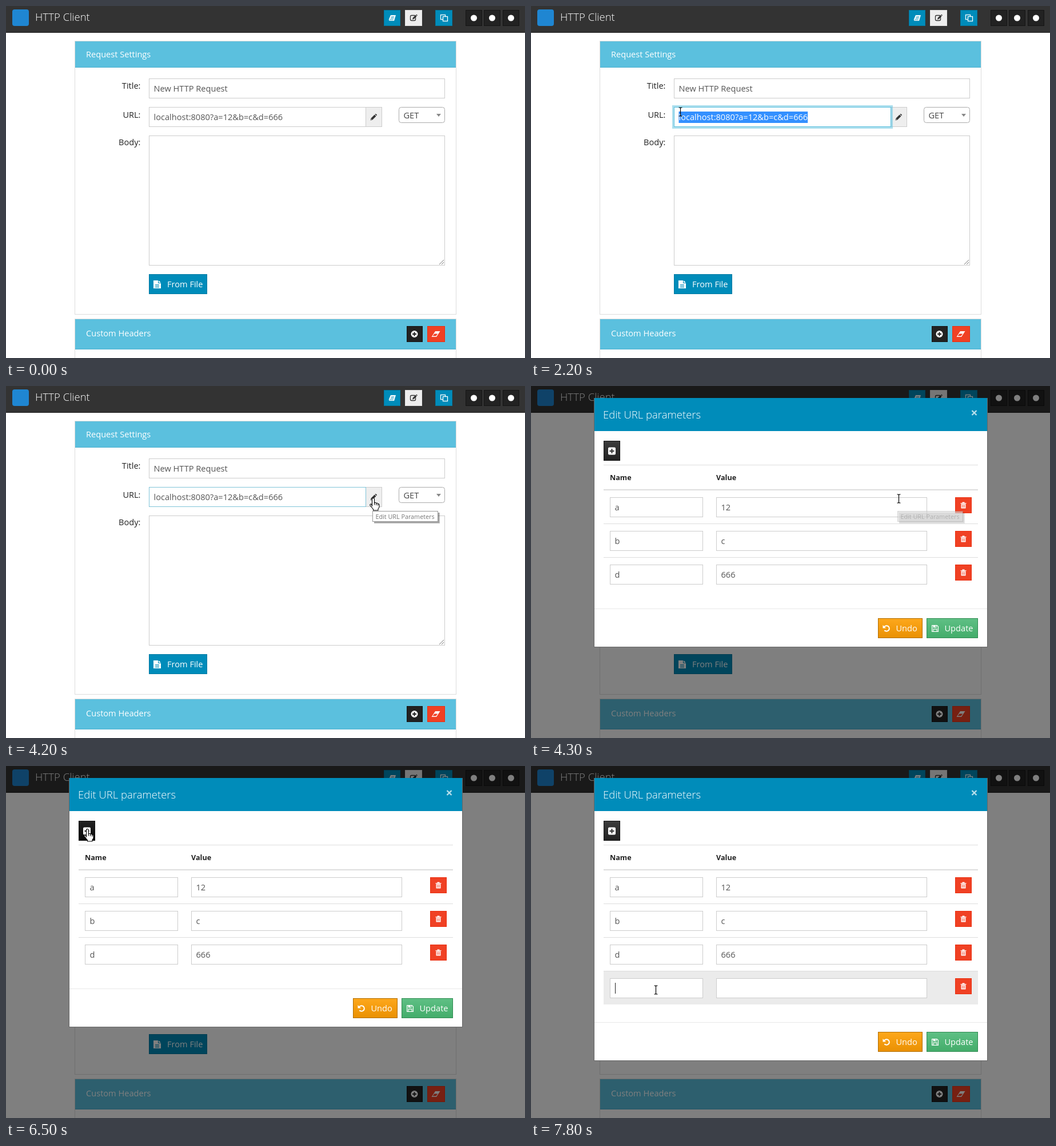
An HTML page with a canvas that plays this animation: 908x617 px, repeating every 8 s.

```html
<!DOCTYPE html>
<html lang="en">
<head>
<meta charset="utf-8">
<title>HTTP Client</title>
<style>
html, body { margin: 0; width: 100%; height: 100%; overflow: hidden; background: #fff; }
canvas { display: block; width: 908px; height: 617px; }
</style>
</head>
<body>
<canvas id="stage" width="908" height="617"></canvas>
<script>
const ctx = document.getElementById('stage').getContext('2d');
const LOOP = 8000, STEP = 100;
const FONT = '"Open Sans", sans-serif';
const BODY = '14.6px ' + FONT, TITLE = '300 18.5px ' + FONT;
const URL_TEXT = 'localhost:8080?a=12&b=c&d=666';
const BLUE = '#008cba', INFO = '#5bc0de', RED = '#f04124', INK = '#555';

// Pointer stops: time, x, y
const STOPS = [
  [500, 754, 457], [1300, 490, 196], [1600, 270, 194], [1700, 270, 194],
  [2000, 261, 185], [2200, 261, 185], [2800, 643, 197], [5700, 643, 197],
  [6500, 143, 111], [7200, 143, 111], [7700, 218, 392]
];

// Icons, centred on the origin
const ICONS = {
  book: 'M-3-5H6L3 5H-5Q-7 4-6 2ZM-2-2.6H3.4L3.1-1.6H-2.3ZM-3-.2H2.6L2.3.8H-3.3ZM-4.6 2.6H1.9L1.6 3.6H-5Z',
  pencil: 'M-6 6L-5 2L2-5L5-2L-2 5ZM2.8-5.8L4-6.6Q4.6-6.8 5.2-6.2L6.2-5.2Q6.8-4.6 6.4-4L5.7-2.9ZM-4.4 3L-4.9 5L-3 4.5Z',
  file: 'M-6-7H2V-2H7V7H-6ZM3-7L7-3H3ZM-3 0H4V1H-3ZM-3 2.2H4V3.2H-3ZM-3 4.4H4V5.4H-3Z',
  plusSquare: 'M-4.5-6.5H4.5Q6.5-6.5 6.5-4.5V4.5Q6.5 6.5 4.5 6.5H-4.5Q-6.5 6.5-6.5 4.5V-4.5Q-6.5-6.5-4.5-6.5ZM-1-4V-1H-4V1H-1V4H1V1H4V-1H1V-4Z',
  plusCircle: 'M-6 0A6 6 0 0 1 6 0A6 6 0 0 1-6 0ZM-1-3.5V-1H-3.5V1H-1V3.5H1V1H3.5V-1H1V-3.5Z',
  eraser: 'M-1-5H7.5L1 5H-7.5ZM-2.6-.6L-5.6 3.6H.3L3.3-.6Z',
  trash: 'M-5-4H-2V-5.5H2V-4H5V-2.8H-5ZM-4-2.2H4V5.5H-4ZM-2.4-1V4H-1.6V-1ZM-.4-1V4H.4V-1ZM1.6-1V4H2.4V-1Z',
  floppy: 'M-6-6H3.5L6-3.5V6H-6ZM-4.8-4.8V4.8H-3.6V.6H3.6V4.8H4.8V-3L3-4.8H2.6V-1.4H-3.4V-4.8ZM.2-4.8V-2.4H1.6V-4.8ZM-2.5 1.8V4.8H2.5V1.8Z'
};
for (const name in ICONS) ICONS[name] = new Path2D(ICONS[name]);

const ARROW = new Path2D('M.5.5V16.5L4.2 13L6.8 18.6L9 17.6L6.5 12.2H11.5Z');
const HAND = new Path2D('M-3 13V1a2 2 0 0 1 4 0V7.5a2 2 0 0 1 3.4.6a1.9 1.9 0 0 1 3 1a1.6 1.6 0 0 1 2.1 1.6V15L7.5 18V20.5H-1V18.5L-6.6 11.6a1.6 1.6 0 0 1 2.6-1.7Z');
const IBEAM = new Path2D('M-3-7.5H-1L0-6.5L1-7.5H3M0-6.5V6.5M-3 7.5H-1L0 6.5L1 7.5H3');

function rect(x, y, w, h, fill) {
  ctx.fillStyle = fill;
  ctx.fillRect(x, y, w, h);
}

function box(x, y, w, h, fill, border) {
  rect(x, y, w, h, border);
  rect(x + 1, y + 1, w - 2, h - 2, fill);
}

function text(str, x, y, color, font = BODY, align = 'left') {
  ctx.font = font;
  ctx.textAlign = align;
  ctx.fillStyle = color;
  ctx.fillText(str, x, y);
}

function icon(name, x, y, color = '#fff', scale = 1) {
  ctx.save();
  ctx.translate(x, y);
  ctx.scale(scale, scale);
  ctx.fillStyle = color;
  ctx.fill(ICONS[name], 'evenodd');
  ctx.restore();
}

function line(points, color, width = 1) {
  ctx.strokeStyle = color;
  ctx.lineWidth = width;
  ctx.beginPath();
  points.forEach(([x, y]) => ctx.lineTo(x, y));
  ctx.stroke();
}

function dot(x, y, r) {
  ctx.fillStyle = '#fff';
  ctx.beginPath();
  ctx.arc(x, y, r, 0, 7);
  ctx.fill();
}

function gradient(y, h, top, bottom) {
  const g = ctx.createLinearGradient(0, y, 0, y + h);
  g.addColorStop(0, top);
  g.addColorStop(1, bottom);
  return g;
}

const ramp = (t, from, to) => Math.min(1, Math.max(0, (t - from) / (to - from)));
const inside = (p, x, y, w, h) => p.x >= x && p.x <= x + w && p.y >= y && p.y <= y + h;

function pointerAt(t) {
  if (t < STOPS[0][0]) return null;
  const i = STOPS.findIndex(s => s[0] > t);
  if (i < 0) {
    const [, x, y] = STOPS[STOPS.length - 1];
    return { x, y };
  }
  const [t0, x0, y0] = STOPS[i - 1], [t1, x1, y1] = STOPS[i];
  const u = ramp(t, t0, t1), k = u * u * (3 - 2 * u);
  return { x: Math.round(x0 + (x1 - x0) * k), y: Math.round(y0 + (y1 - y0) * k) };
}

function drawHeader() {
  rect(0, 0, 908, 47, '#333');
  rect(0, 46, 908, 1, '#222');
  ctx.fillStyle = '#1f86d2';
  ctx.beginPath();
  ctx.roundRect(11, 6, 29, 29, 4);
  ctx.fill();
  text('HTTP Client', 51, 26, '#fff', TITLE);

  box(661, 7, 29, 28, BLUE, '#0079a1');
  icon('book', 676, 21);
  box(698, 7, 30, 28, '#eee', '#e2e2e2');
  ctx.strokeStyle = '#333';
  ctx.lineWidth = 1.3;
  ctx.beginPath();
  ctx.roundRect(707.5, 16.5, 9, 9, 2);
  ctx.stroke();
  icon('pencil', 715, 19.5, '#333', .72);
  box(751, 7, 30, 28, BLUE, '#0079a1');
  ctx.strokeStyle = '#fff';
  ctx.strokeRect(760.5, 15.5, 8, 8);
  rect(764, 18, 9, 9, BLUE);
  ctx.strokeRect(764.5, 18.5, 8, 8);
  for (const x of [804, 836, 869]) {
    box(x, 7, 29, 28, '#222', '#151515');
    dot(x + 14.5, 21, 5.5);
  }
}

function drawUrl(t, pointer) {
  box(250, 177, 408, 35, '#eee', '#ccc');
  box(250, 177, 380, 35, '#fff', '#ccc');
  const focus = t < 4100 ? ramp(t, 1200, 1600) : 1 - ramp(t, 4000, 4300);
  if (focus > 0) {
    ctx.save();
    ctx.globalAlpha = Math.max(0, focus * 2 - 1) * .5;
    ctx.strokeStyle = INFO;
    ctx.lineWidth = 3;
    ctx.strokeRect(248.5, 175.5, 383, 38);
    ctx.globalAlpha = Math.min(1, focus * 2);
    ctx.lineWidth = 1;
    ctx.strokeRect(250.5, 177.5, 379, 34);
    ctx.restore();
  }
  text(URL_TEXT, 258.5, 200, INK);
  if (t > 1300 && t < 4100) {
    const edge = t < 2000 ? pointer.x - 258.5 : 0;
    let start = 0, i = 0;
    while (i < URL_TEXT.length && ctx.measureText(URL_TEXT.slice(0, i + 1)).width <= edge) i++;
    start = ctx.measureText(URL_TEXT.slice(0, i)).width;
    const width = ctx.measureText(URL_TEXT).width - start;
    ctx.save();
    ctx.beginPath();
    ctx.rect(258.5 + start, 185, width, 20);
    ctx.clip();
    rect(250, 185, 379, 20, '#3390ff');
    text(URL_TEXT, 258.5, 200, '#fff');
    ctx.restore();
  }
  icon('pencil', 643, 195, '#333', .9);
}

function drawPage(t, pointer) {
  rect(0, 0, 908, 617, '#fff');
  drawHeader();
  box(120, 61, 668, 480, '#fff', '#ddd');
  rect(121, 62, 666, 45, INFO);
  rect(121, 107, 666, 1, '#4bb0cf');
  text('Request Settings', 140, 90, '#fff');

  text('Title:', 235.5, 145, '#222', BODY, 'right');
  text('URL:', 235.5, 195.5, '#222', BODY, 'right');
  text('Body:', 235.5, 244, '#222', BODY, 'right');
  box(250, 127, 518, 35, '#fff', '#ccc');
  text('New HTTP Request', 258.5, 150, INK);
  drawUrl(t, pointer);

  ctx.strokeStyle = '#aaa';
  ctx.lineWidth = 1;
  ctx.beginPath();
  ctx.roundRect(687.5, 177.5, 80, 27, 4);
  ctx.stroke();
  text('GET', 695.5, 197, '#444');
  ctx.fillStyle = '#888';
  ctx.fill(new Path2D('M753 189H761L757 194Z'));

  box(250, 227, 518, 228, '#fff', '#ccc');
  line([[758, 453], [766, 445]], '#777');
  line([[762, 453], [766, 449]], '#777');

  box(250, 470, 102, 35, BLUE, '#0079a1');
  icon('file', 264, 488);
  text('From File', 282, 493, '#fff');

  box(120, 548, 668, 90, '#fff', '#ddd');
  rect(121, 549, 666, 52, INFO);
  rect(121, 601, 666, 1, '#4bb0cf');
  text('Custom Headers', 140, 579, '#fff');
  box(701, 561, 28, 28, '#222', '#151515');
  icon('plusCircle', 714.5, 575);
  box(737, 561, 31, 28, RED, '#ea2f10');
  icon('eraser', 752, 575);
}

function drawRow(i, name, value, hovered) {
  const y = 182 + 59 * i;
  if (hovered) rect(127, y + 1, 655, 58, '#ebebeb');
  if (i) rect(127, y, 655, 1, '#ddd');
  box(138, y + 13, 163, 35, '#fff', '#ccc');
  box(324, y + 13, 369, 35, '#fff', '#ccc');
  text(name, 146.5, y + 35.5, INK);
  text(value, 332.5, y + 35.5, INK);
  box(742, y + 13, 29, 28, RED, '#ea2f10');
  icon('trash', 756.5, y + 27);
}

function drawModal(t, pointer) {
  const rows = [['a', '12'], ['b', 'c'], ['d', '666']];
  if (t >= 7100) rows.push(['', '']);
  const shift = 59 * (rows.length - 3);

  rect(0, 0, 908, 617, 'rgba(0,0,0,.5)');
  box(110, 21, 689, 437 + shift, '#fff', '#666');
  rect(111, 21, 687, 58, BLUE);
  text('Edit URL parameters', 126, 57, '#fff', TITLE);
  line([[771.5, 43], [779.5, 51]], '#b8dfec', 2.4);
  line([[779.5, 43], [771.5, 51]], '#b8dfec', 2.4);

  const onAdd = inside(pointer, 127, 96, 29, 35);
  box(127, 96, 29, 35, onAdd ? gradient(96, 35, '#222', '#090909') : gradient(96, 35, '#3c3c3c', '#222'), '#111');
  icon('plusSquare', 141.5, 114);

  rect(127, 138, 655, 1, '#ddd');
  text('Name', 138, 165, '#222', 'bold 12.6px ' + FONT);
  text('Value', 324, 165, '#222', 'bold 12.6px ' + FONT);
  rows.forEach(([name, value], i) =>
    drawRow(i, name, value, t >= 5700 && inside(pointer, 127, 182 + 59 * i, 655, 58)));
  rect(127, 181, 655, 2, '#ddd');
  if (t >= 7800) rect(147, 380, 1, 19, '#222');

  rect(111, 390 + shift, 687, 1, '#e8e8e8');
  const y = 407 + shift;
  box(607, y, 78, 35, gradient(y, 35, '#fea81c', '#e99002'), '#b06d02');
  ctx.strokeStyle = '#fff';
  ctx.lineWidth = 2;
  ctx.beginPath();
  ctx.arc(622, y + 18, 4.8, -2.5, 2.4);
  ctx.stroke();
  ctx.fillStyle = '#fff';
  ctx.fill(new Path2D(`M615.5 ${y + 12}V${y + 17.5}H621Z`));
  text('Undo', 638.5, y + 23, '#fff');
  box(692, y, 90, 35, gradient(y, 35, '#5fc085', '#43ac6a'), '#2f8a50');
  icon('floppy', 707, y + 18);
  text('Update', 723.5, y + 23, '#fff');
}

function drawTip(label, x, y, w, alpha) {
  if (alpha <= 0) return;
  ctx.save();
  ctx.globalAlpha = alpha;
  rect(x + 3, y + 3, w, 19, 'rgba(0,0,0,.22)');
  rect(x + 3, y + 3, w - 1, 18, 'rgba(0,0,0,.18)');
  box(x, y, w, 19, '#fff', '#999');
  text(label, x + 5.5, y + 13.5, '#767676', '10.8px ' + FONT);
  ctx.restore();
}

function tipAlpha(t) {
  if (t < 4300) return ramp(t, 3200, 3500);
  return t < 4400 ? .4 : 0;
}

function addTipAlpha(t) {
  if (t < 7100) return ramp(t, 6800, 7000) * .95;
  return .7 * (1 - ramp(t, 7100, 7250));
}

function pointerShape(p, modal) {
  if (modal) {
    if (inside(p, 127, 96, 29, 35)) return HAND;
    for (let i = 0; i < 4; i++) {
      const y = 195 + 59 * i;
      if (inside(p, 138, y, 163, 35) || inside(p, 324, y, 369, 35)) return IBEAM;
    }
    return ARROW;
  }
  if (inside(p, 630, 177, 28, 35)) return HAND;
  return inside(p, 250, 177, 380, 35) || inside(p, 250, 227, 518, 228) ? IBEAM : ARROW;
}

function drawPointer(p, shape) {
  ctx.save();
  ctx.translate(p.x + .5, p.y + .5);
  ctx.lineJoin = 'round';
  ctx.lineWidth = shape === IBEAM ? 1.2 : 1.1;
  ctx.strokeStyle = '#000';
  if (shape !== IBEAM) {
    ctx.fillStyle = '#fff';
    ctx.fill(shape);
  }
  ctx.stroke(shape);
  if (shape === HAND) {
    ctx.stroke(new Path2D('M1 7V11M4.2 8V11.5M7.2 9.2V12'));
  }
  ctx.restore();
}

function render(t) {
  const pointer = pointerAt(t), modal = t >= 4300;
  drawPage(t, pointer);
  if (modal) drawModal(t, pointer);
  drawTip('Edit URL Parameters', 641, 219, 115, tipAlpha(t));
  drawTip('Add New Parameter ...', 142, 135, 127, addTipAlpha(t));
  if (pointer) drawPointer(pointer, pointerShape(pointer, modal));
}

function tick() {
  const t = performance.now() % LOOP;
  render(Math.floor(t / STEP) * STEP);
  requestAnimationFrame(tick);
}
tick();
</script>
</body>
</html>
```
